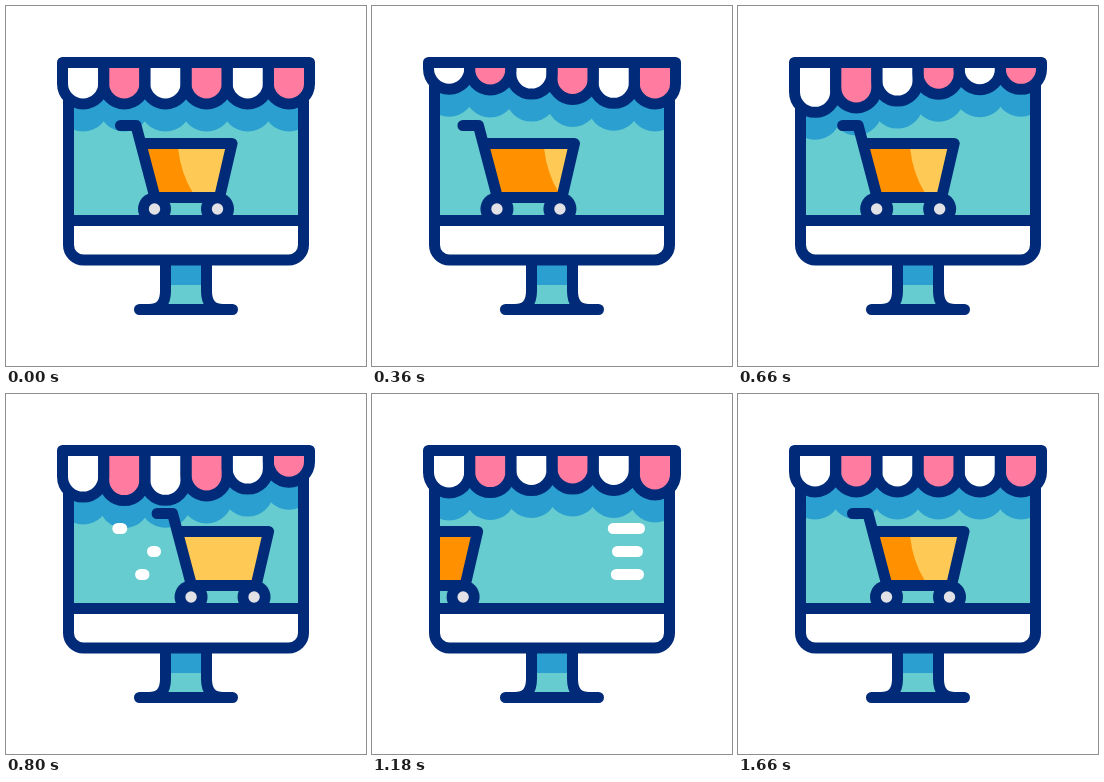
These frames come from a looping animation (360 by 360 pixels, 2400 ms). An HTML page with a canvas:

```html
<!DOCTYPE html>
<html lang="en">
<head>
<meta charset="utf-8">
<title>Online shop</title>
<style>
html, body { margin: 0; width: 100%; height: 100%; overflow: hidden; background: #fff; }
canvas { display: block; width: 360px; height: 360px; }
</style>
</head>
<body>
<canvas id="stage"></canvas>
<script>
const LOOP = 2400;
const NAVY = '#012b78', TEAL = '#66cccf', BLUE = '#2a9fd0', WHITE = '#fff';
const PINK = '#ff7b9f', ORANGE = '#ff9100', YELLOW = '#ffc955', HUB = '#e2e2e6';

const canvas = document.getElementById('stage');
const ctx = canvas.getContext('2d');
const dpr = window.devicePixelRatio || 1;
canvas.width = canvas.height = 360 * dpr;

const ease = p => (1 - Math.cos(Math.PI * Math.min(1, Math.max(0, p)))) / 2;
const span = (t, a, b) => ease((t - a) / (b - a));

// Awning: a damped swing that travels from left to right
const SWING = [[40, 0], [340, -15], [700, 9], [960, -3], [1150, 1], [1300, 0]];
const STEP = 41.17, LEFT = 56.5, LAG = 70;

function drop(t, i) {
  const u = t - i * LAG;
  if (u <= SWING[0][0]) return 0;
  for (let k = 1; k < SWING.length; k++) {
    const [t0, y0] = SWING[k - 1], [t1, y1] = SWING[k];
    if (u < t1) return y0 + (y1 - y0) * span(u, t0, t1);
  }
  return 0;
}

// Cart: leans back, dashes off to the right, glides in from the left
function cartShift(t) {
  if (t < 450) return -26 * ease(t / 450);
  if (t < 1060) return -26 + 136 * ((t - 450) / 470) ** 2.66;
  if (t < 1660) return -121 * ((1660 - t) / 480) ** 2.44;
  return 0;
}

function trace(points) {
  ctx.beginPath();
  points.forEach(([x, y], i) => i ? ctx.lineTo(x, y) : ctx.moveTo(x, y));
}

function line(points, color = NAVY) {
  trace(points);
  ctx.strokeStyle = color;
  ctx.stroke();
}

function rect(x, y, w, h, color) {
  ctx.fillStyle = color;
  ctx.fillRect(x, y, w, h);
}

function disc(x, y, r, color) {
  ctx.beginPath();
  ctx.arc(x, y, r, 0, Math.PI * 2);
  ctx.fillStyle = color;
  ctx.fill();
}

function drawShade(t) {
  for (let i = 0; i < 6; i++) {
    const x = LEFT + STEP * (i + 0.5), y = 99.5 + drop(t, i);
    rect(x - 26, 56, 52, y - 56, BLUE);
    disc(x, y, 26, BLUE);
  }
}

function drawDashes(t) {
  const head = span(t, 760, 1110), tail = span(t, 768, 1332);
  if (head - tail < 0.01) return;
  [[110.5, 267.5, 134.5], [145.5, 265.5, 157.5], [133.5, 266.5, 180.5]].forEach(([a, b, y]) => {
    line([[a + (b - a) * tail, y], [a + (b - a) * head, y]], WHITE);
  });
}

function drawCart(t) {
  const dx = cartShift(t);
  const at = (x, y) => [x + dx, y];
  const basket = [at(134.8, 137.5), at(226, 137.5), at(213.5, 191.5), at(149, 191.5)];

  // The highlight edge stays put while the basket passes it
  ctx.save();
  trace(basket);
  ctx.clip();
  rect(60, 130, 240, 70, ORANGE);
  ctx.beginPath();
  ctx.moveTo(172, 130);
  ctx.lineTo(172, 142);
  ctx.quadraticCurveTo(175, 168, 187, 187);
  ctx.lineTo(191, 200);
  ctx.lineTo(320, 200);
  ctx.lineTo(320, 130);
  ctx.fillStyle = YELLOW;
  ctx.fill();
  ctx.restore();

  line([at(114.5, 119.5), at(130, 119.5), ...basket.slice(3), basket[2], basket[1], basket[0]]);
  for (const x of [148.5, 211.5]) {
    disc(x + dx, 203, 16.5, NAVY);
    disc(x + dx, 203, 5.7, HUB);
  }
}

function drawStand() {
  ctx.beginPath();
  ctx.moveTo(159.5, 254);
  ctx.lineTo(159.5, 285);
  ctx.quadraticCurveTo(159.5, 303.5, 143, 303.5);
  ctx.lineTo(217, 303.5);
  ctx.quadraticCurveTo(200.5, 303.5, 200.5, 285);
  ctx.lineTo(200.5, 254);
  ctx.save();
  ctx.clip();
  rect(140, 254, 80, 25, BLUE);
  rect(140, 279, 80, 25, TEAL);
  ctx.restore();
  ctx.strokeStyle = NAVY;
  ctx.stroke();
  line([[133.5, 303.5], [226.5, 303.5]]);
}

function drawFrame() {
  ctx.beginPath();
  ctx.moveTo(62.5, 60);
  ctx.lineTo(62.5, 239);
  ctx.arcTo(62.5, 254, 77.5, 254, 15);
  ctx.lineTo(282.5, 254);
  ctx.arcTo(297.5, 254, 297.5, 239, 15);
  ctx.lineTo(297.5, 60);
  ctx.strokeStyle = NAVY;
  ctx.stroke();
  line([[62.5, 214.5], [297.5, 214.5]]);
}

function drawAwning(t) {
  const flap = i => {
    const x = LEFT + STEP * i, r = STEP / 2, y = 77.4 + drop(t, i);
    ctx.beginPath();
    ctx.moveTo(x, 56.5);
    ctx.lineTo(x, y);
    ctx.arc(x + r, y, r, Math.PI, 0, true);
    ctx.lineTo(x + STEP, 56.5);
    ctx.closePath();
  };
  for (let i = 0; i < 6; i++) {
    flap(i);
    ctx.fillStyle = i % 2 ? PINK : WHITE;
    ctx.fill();
  }
  ctx.strokeStyle = NAVY;
  for (let i = 0; i < 6; i++) {
    flap(i);
    ctx.stroke();
  }
}

function draw(t) {
  ctx.setTransform(dpr, 0, 0, dpr, 0, 0);
  ctx.lineWidth = 11;
  ctx.lineCap = ctx.lineJoin = 'round';
  rect(0, 0, 360, 360, WHITE);
  drawStand();
  ctx.save();
  ctx.beginPath();
  ctx.rect(63, 57, 234, 157);
  ctx.clip();
  rect(60, 50, 240, 170, TEAL);
  drawShade(t);
  drawDashes(t);
  drawCart(t);
  ctx.restore();
  ctx.save();
  ctx.beginPath();
  ctx.roundRect(63, 215, 234, 39, [0, 0, 15, 15]);
  ctx.fillStyle = WHITE;
  ctx.fill();
  ctx.restore();
  drawFrame();
  drawAwning(t);
}

const start = performance.now();
function tick() {
  draw((performance.now() - start) % LOOP);
  requestAnimationFrame(tick);
}
tick();
</script>
</body>
</html>
```
